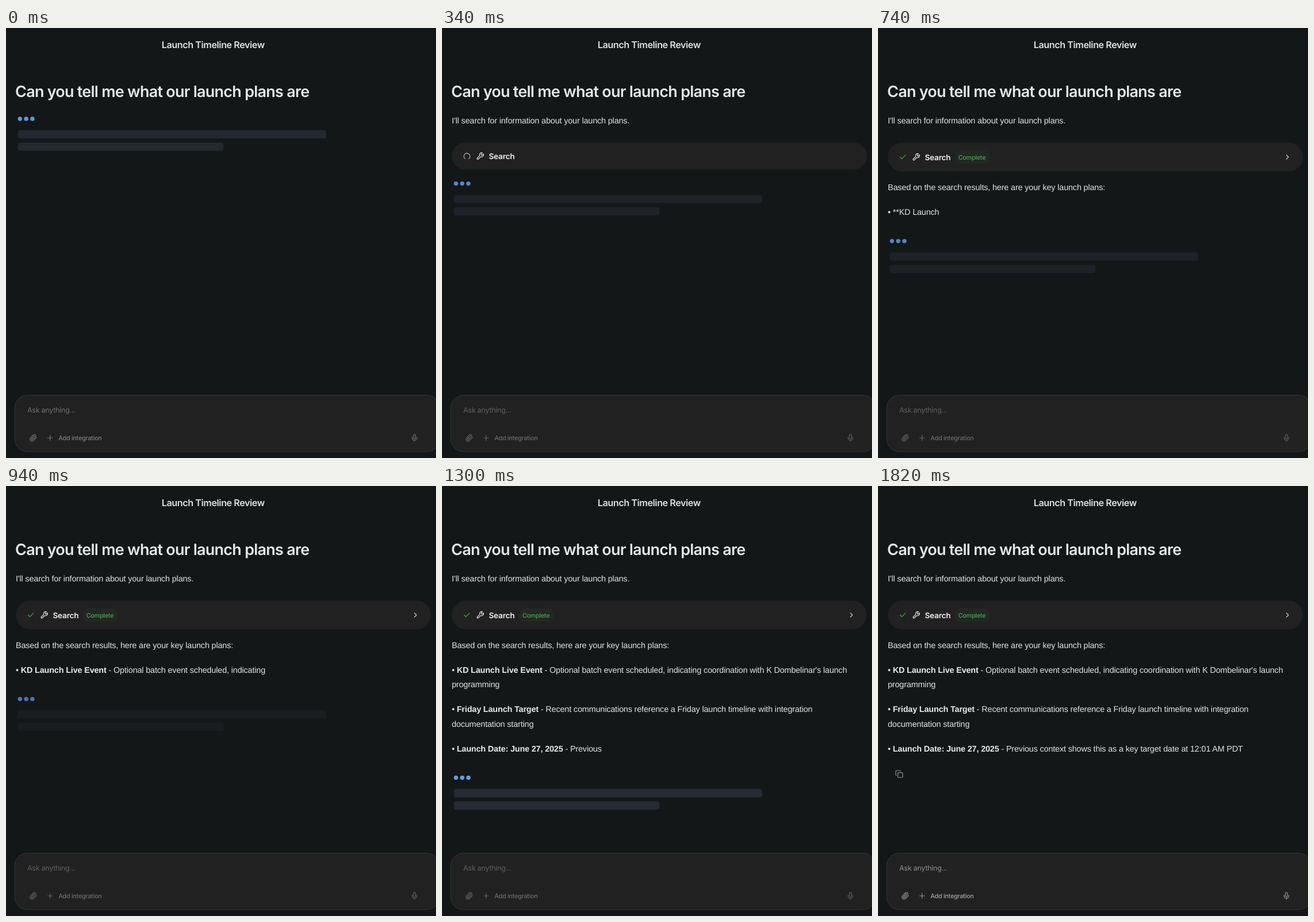
An HTML page that plays this animation: 748 by 748 pixels, repeating every 1.86 s.

```html
<!DOCTYPE html>
<html lang="en">
<head>
<meta charset="utf-8">
<title>Launch Timeline Review</title>
<style>
  html, body { margin: 0; width: 100%; height: 100%; overflow: hidden; background: #141717; }
  svg { display: block; }
  text { text-rendering: geometricPrecision; }
  .ui { font-family: Inter, sans-serif; font-optical-sizing: none; letter-spacing: -.025em; }
  .title { font-size: 16.2px; font-weight: 600; letter-spacing: -.028em; fill: #dfe1e1; }
  .question { font-size: 27px; font-weight: 600; letter-spacing: -.028em; fill: #e6e8e8; }
  .tool { font-size: 13.5px; font-weight: 600; letter-spacing: -.01em; fill: #f3f3f3; }
  .badge { font-size: 10.8px; font-weight: 500; fill: #48a34d; }
  .hint { font-size: 12.6px; fill: #8e8e8e; }
  .add { font-size: 10.8px; font-weight: 500; fill: #a2a3a3; }
  .body { font: 14.4px "Liberation Sans", Arial, sans-serif; letter-spacing: -.0105em; fill: #e2e4e4; }
  .body .b { font-weight: 700; fill: #e9ebeb; }
  .icon { fill: none; stroke-width: 2; stroke-linecap: round; stroke-linejoin: round; }
</style>
</head>
<body>
<svg id="stage" width="748" height="748" viewBox="0 0 748 748">
  <rect width="748" height="748" fill="#141717"/>
  <text class="ui title" x="270.8" y="34.9">Launch Timeline Review</text>
  <text class="ui question" x="16" y="120">Can you tell me what our launch plans are</text>
  <text class="body" id="intro" x="17" y="166.3"></text>

  <g id="card">
    <rect id="pill" x="17" y="199.3" width="722" fill="#212121"/>
    <g id="row">
      <g id="spinner"></g>
      <g id="done">
        <rect x="133.5" y="211.5" width="61.5" height="23" rx="11.5" fill="#222823"/>
        <text class="ui badge" x="139.7" y="227">Complete</text>
      </g>
      <text class="ui tool" x="81.4" y="228">Search</text>
    </g>
  </g>

  <g id="answer"></g>

  <g id="loader">
    <g id="dots" fill="#66a3f4">
      <circle cx="24.3" r="3.7"/><circle cx="35.1" r="3.7"/><circle cx="45.9" r="3.7"/>
    </g>
    <g id="bars" fill="#2a2e39">
      <rect x="20.7" y="19.6" width="536.3" height="14.4" rx="4"/>
      <rect x="20.7" y="41.2" width="357.5" height="14.4" rx="4"/>
    </g>
  </g>
  <g id="copy"></g>

  <rect x="15.2" y="638.7" width="739" height="98.2" rx="22" fill="#212121" stroke="#343636"/>
  <g id="composer">
    <text class="ui hint" x="37" y="668.9">Ask anything...</text>
    <text class="ui add" x="91.2" y="716.8">Add integration</text>
  </g>
</svg>
<script>
const LOOP = 1860;
const $ = id => document.getElementById(id);

const ICONS = {
  wrench: 'M14.7 6.3a1 1 0 0 0 0 1.4l1.6 1.6a1 1 0 0 0 1.4 0l3.77-3.77a6 6 0 0 1-7.94 7.94l-6.91 6.91a2.12 2.12 0 0 1-3-3l6.91-6.91a6 6 0 0 1 7.94-7.94l-3.76 3.76z',
  check: 'M20 6 9 17l-5-5',
  chevron: 'm9 18 6-6-6-6',
  ring: 'M21 12a9 9 0 1 1-6.219-8.56',
  copy: 'M10 8h10a2 2 0 0 1 2 2v10a2 2 0 0 1-2 2H10a2 2 0 0 1-2-2V10a2 2 0 0 1 2-2zM4 16c-1.1 0-2-.9-2-2V4c0-1.1.9-2 2-2h10c1.1 0 2 .9 2 2',
  clip: 'm21.44 11.05-9.19 9.19a6 6 0 0 1-8.49-8.49l8.57-8.57A4 4 0 1 1 18 8.84l-8.59 8.57a2 2 0 0 1-2.83-2.83l8.49-8.48',
  plus: 'M5 12h14M12 5v14',
  mic: 'M12 2a3 3 0 0 0-3 3v7a3 3 0 0 0 6 0V5a3 3 0 0 0-3-3ZM19 10v2a7 7 0 0 1-14 0v-2M12 19v3'
};

function addIcon(parent, name, x, y, color) {
  parent.insertAdjacentHTML('beforeend',
    `<path class="icon" d="${ICONS[name]}" stroke="${color}" transform="translate(${x} ${y}) scale(.6) translate(-12 -12)"/>`);
}
addIcon($('spinner'), 'ring', 0, 0, '#b4b6b6');
addIcon($('done'), 'check', 43.3, 223, '#459d4a');
addIcon($('done'), 'chevron', 712.2, 223, '#d2d3d3');
addIcon($('row'), 'wrench', 66.4, 223, '#e4e5e5');
addIcon($('copy'), 'copy', 36.9, 501, '#929595');
addIcon($('composer'), 'clip', 47.6, 713, '#979898');
addIcon($('composer'), 'plus', 76.7, 713, '#979898');
addIcon($('composer'), 'mic', 710.5, 713, '#979898');

const INTRO = "I'll search for information about your launch plans.".split(' ');
const LINES = [
  [281.8, 'Based on the search results, here are your key launch plans:'],
  [325, "• **KD Launch Live Event** - Optional batch event scheduled, indicating coordination with K Dombelinar's launch"],
  [350.2, 'programming'],
  [393.4, '• **Friday Launch Target** - Recent communications reference a Friday launch timeline with integration'],
  [418.6, 'documentation starting'],
  [461.8, '• **Launch Date: June 27, 2025** - Previous context shows this as a key target date at 12:01 AM PDT']
].map(([y, text]) => {
  $('answer').insertAdjacentHTML('beforeend', `<text class="body" x="17" y="${y}"></text>`);
  return { y, tokens: text.match(/ ?(?:\*\*\w+|[^\s*]+|\*\*)/g), el: $('answer').lastElementChild };
});

// Tables of [time, value]
const STREAM = [[500, 0], [600, 8], [940, 23], [1140, 33], [1300, 55], [1440, 67]];
const PULSE = [[0, .75], [190, .4], [340, .5], [480, .75], [600, .62], [940, .27], [1040, .22], [1140, .3], [1300, .85], [1400, .9], [1600, .4]];
const INPUT = [[0, .72], [140, .57], [1600, .57], [1680, 1]];
const INTRO_IN = [[110, 0], [230, 8]];

function at(table, t) {
  if (t <= table[0][0]) return table[0][1];
  for (let i = 1; i < table.length; i++) {
    const [t0, v0] = table[i - 1], [t1, v1] = table[i];
    if (t < t1) return v0 + (v1 - v0) * (t - t0) / (t1 - t0);
  }
  return table[table.length - 1][1];
}

const show = (id, on) => $(id).setAttribute('visibility', on ? 'inherit' : 'hidden');
const move = (id, value) => $(id).setAttribute('transform', value);

function setText(el, text) {
  if (el.shown === text) return;
  el.shown = text;
  el.innerHTML = text.replace(/\*\*(.+?)\*\*/g, '<tspan class="b">$1</tspan>');
}

function streamAnswer(count) {
  let last = 0;
  for (const line of LINES) {
    const n = Math.max(0, Math.min(count, line.tokens.length));
    setText(line.el, line.tokens.slice(0, n).join(''));
    if (n) last = line.y;
    count -= line.tokens.length;
  }
  return last;
}

function draw(t) {
  const introWords = Math.floor(at(INTRO_IN, t) + .001);
  const called = t >= 260, complete = t >= 460;
  setText($('intro'), INTRO.slice(0, introWords).join(' '));
  const lastLine = streamAnswer(Math.floor(at(STREAM, t) + .001));

  show('card', called);
  const height = complete ? 50.2 : 47;
  $('pill').setAttribute('height', height);
  $('pill').setAttribute('rx', height / 2);
  move('row', `translate(0 ${complete ? 1.5 : 0})`);
  show('done', complete);
  show('spinner', !complete);
  move('spinner', `translate(43.4 223.2) rotate(${125 + (t - 340) * .9})`);

  let y = 158;
  if (lastLine) y = lastLine + 45.6;
  else if (complete) y = 274;
  else if (called) y = 270.6;
  else if (introWords) y = 212;
  const finished = t >= 1580;
  show('loader', !finished);
  move('loader', `translate(0 ${y})`);
  const pulse = at(PULSE, t);
  $('bars').setAttribute('opacity', pulse);
  $('dots').setAttribute('opacity', .55 + pulse / 2);

  show('copy', finished);
  $('copy').setAttribute('opacity', at([[1580, 0], [1660, 1]], t));
  $('composer').setAttribute('opacity', at(INPUT, t));
}

const start = performance.now();
function tick() {
  draw((performance.now() - start) % LOOP);
  requestAnimationFrame(tick);
}
draw(0);
requestAnimationFrame(tick);
</script>
</body>
</html>
```
